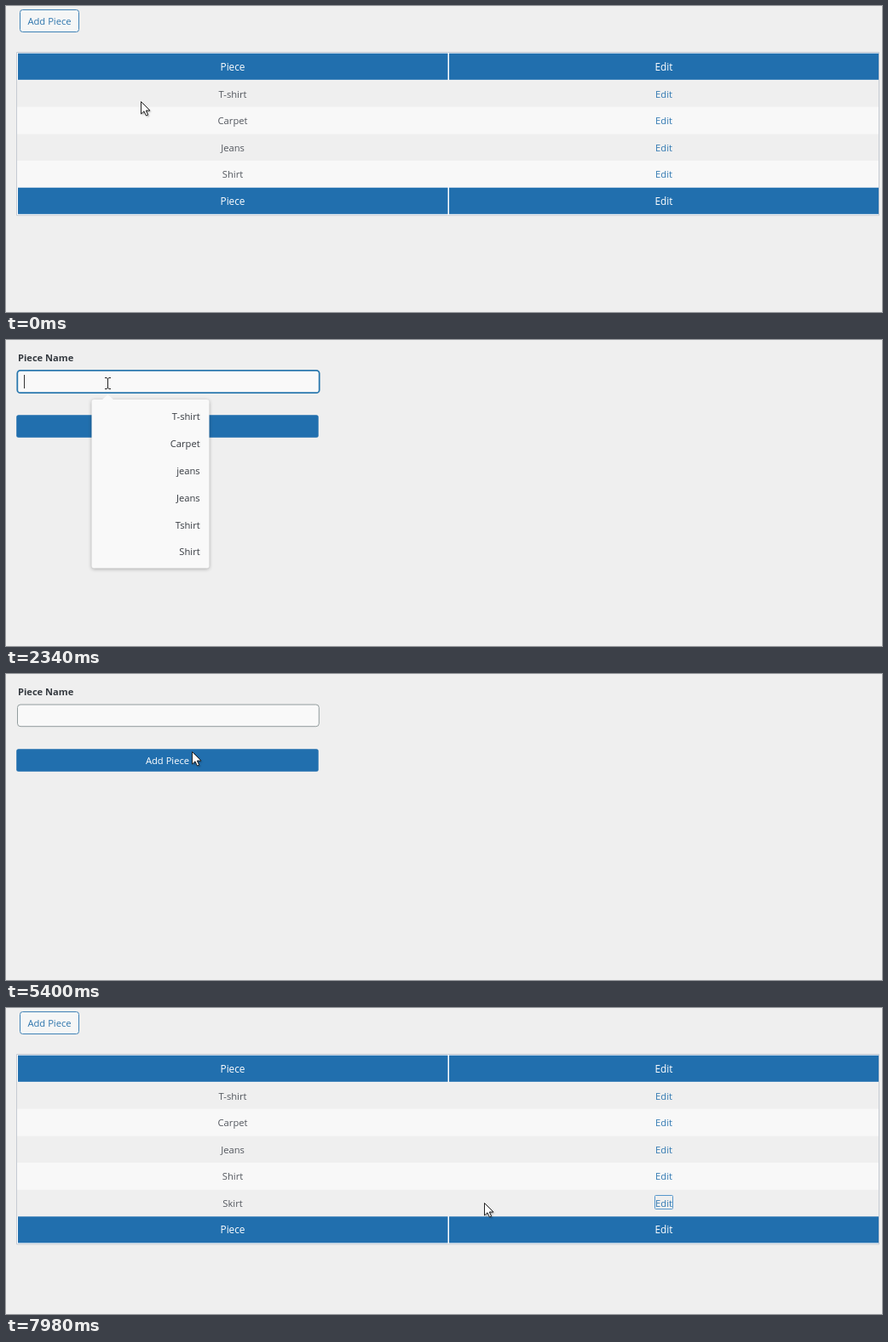
These frames come from a looping animation (1028 by 360 pixels, 8 s). An HTML page with a canvas:

```html
<!DOCTYPE html>
<html lang="en">
<head>
<meta charset="utf-8">
<title>Add a piece</title>
<style>
html, body { margin: 0; width: 100%; height: 100%; overflow: hidden; background: #efefef; }
canvas { display: block; }
</style>
</head>
<body>
<canvas id="stage" width="1028" height="360"></canvas>
<script>
const c = document.getElementById('stage').getContext('2d');
const LOOP = 8000, STEP = 30, PITCH = 31.6;
const BLUE = '#216fae', BG = '#efefef', PALE = '#f8f8f8';

// When things happen, in ms
const T = { addFocus: 690, form: 1680, inputFocus: 2190, list: 2280, submit: 3570,
  reload: 4620, loaded: 5430, table: 6510, scroll: 6780, linkFocus: 7410 };
const keys = [2550, 2670, 2790, 2880, 2970], word = 'Skirt';

// Pointer stops: time, x, y
const path = [
  [0, 158, 112], [510, 58, 20], [1020, 58, 20], [1590, 225, 77], [1680, 225, 77],
  [2100, 119, 51], [3060, 119, 51], [3480, 67, 106], [3660, 67, 106], [3840, 478, 192],
  [4050, 350, 165], [4560, 185, 122], [5130, 185, 122], [5400, 218, 91], [5670, 431, 173],
  [6210, 566, 186], [6900, 566, 186], [7260, 769, 226], [7500, 769, 226], [7920, 561, 229],
  [8000, 561, 229]
];

const inside = ([x, y], l, t, r, b) => x >= l && x < r && y >= t && y < b;

function pointerAt(t) {
  const i = path.findIndex(p => p[0] > t);
  const [t0, x0, y0] = path[i - 1], [t1, x1, y1] = path[i];
  const k = (t - t0) / (t1 - t0), e = k * k * (3 - 2 * k);
  return [Math.round(x0 + (x1 - x0) * e), Math.round(y0 + (y1 - y0) * e)];
}

function rect(l, t, r, b, fill) {
  c.fillStyle = fill;
  c.fillRect(l, t, r - l, b - t);
}

function box(l, t, r, b, radius, fill, stroke, width = 1) {
  c.beginPath();
  c.roundRect(l, t, r - l, b - t, radius);
  if (fill) { c.fillStyle = fill; c.fill(); }
  if (stroke) { c.strokeStyle = stroke; c.lineWidth = width; c.stroke(); }
}

function text(s, x, middle, color, align = 'center', size = 11.2, weight = 400) {
  c.font = `${weight} ${size}px "Open Sans", "Noto Sans", sans-serif`;
  c.textAlign = align;
  c.fillStyle = color;
  c.fillText(s, x, Math.round(middle + 4));
}

function shadow(color, blur, dx, dy) {
  c.shadowColor = color;
  c.shadowBlur = blur;
  c.shadowOffsetX = dx;
  c.shadowOffsetY = dy;
}

function drawTable(t, pointer) {
  const names = ['T-shirt', 'Carpet', 'Jeans', 'Shirt'];
  const late = t >= T.table;
  let scroll = 0;
  if (late) {
    names.push('Skirt');
    scroll = 39.6 * Math.min(1, Math.max(0, 1 - (t - T.scroll) / 120));
  }
  const edge = i => 55.7 + PITCH * i - scroll;
  const middle = i => 72.3 + 31.45 * i - scroll;
  const last = names.length + 1;

  const dy = -Math.round(scroll);
  const focused = !late && t >= T.addFocus;
  const over = inside(pointer, 16, 4 + dy, 86, 31 + dy);
  if (focused) box(16, 4 + dy, 86, 31 + dy, 3, '#f5f6f6', '#3a80b8', 2);
  else box(16.5, 4.5 + dy, 85.5, 30.5 + dy, 3, '#f5f6f6', '#3f82b6');
  text('Add Piece', 51, 18 + dy, over ? '#0a4b78' : '#2f76ad');

  box(12.5, edge(0) - 1.2, 1024.5, edge(last + 1) + 1, 0, '#fff', '#c5cad2');
  for (let i = 0; i <= last; i++) {
    const head = i === 0 || i === last;
    const top = edge(i), bottom = edge(i + 1) - (head ? .5 : 0);
    if (head) {
      rect(14, top, 518.5, bottom, BLUE);
      rect(520, top, 1024, bottom, BLUE);
      text('Piece', 266, middle(i), '#fff', 'center', 11.8);
      text('Edit', 772, middle(i), '#fff', 'center', 11.8);
    } else {
      rect(13, top, 1024, bottom, i % 2 ? BG : PALE);
      text(names[i - 1], 266, middle(i), '#53575e');
      text('Edit', 772, middle(i), '#3279b2');
    }
  }
  if (late && t >= T.linkFocus) box(761.5, 220.5, 782.5, 236.5, 1, null, '#5596cb');
  const onLink = late && inside(pointer, 762, middle(5) - 8, 782, middle(5) + 8);
  return over || onLink ? 'hand' : 'arrow';
}

function drawList() {
  c.save();
  shadow('rgba(0,0,0,.3)', 4, 0, 1);
  box(100.5, 70, 238.5, 268.5, 3, '#f9f9f9');
  c.restore();
  c.beginPath();
  c.moveTo(112, 71);
  c.lineTo(119.5, 64);
  c.lineTo(127, 71);
  c.fillStyle = '#f9f9f9';
  c.fill();
  ['T-shirt', 'Carpet', 'jeans', 'Jeans', 'Tshirt', 'Shirt'].forEach((s, i) =>
    text(s, 227.7, 90.4 + 31.8 * i, '#363a40', 'right'));
}

function drawForm(t, pointer) {
  text('Piece Name', 14, 21.4, '#34393f', 'left', 11.1, 700);

  const focused = t >= T.inputFocus && t < T.submit;
  if (focused) box(13.3, 35.8, 367.7, 62.2, 3.5, '#f9f9f9', '#2a78ae', 1.8);
  else box(13.5, 36, 367.3, 61.7, 3.5, '#f9f9f9', '#929c9d');
  const typed = t < T.reload ? word.slice(0, keys.filter(k => k <= t).length) : '';
  text(typed, 21, 49, '#3c4046', 'left');
  if (focused) {
    const since = Math.max(T.inputFocus, ...keys.filter(k => k <= t));
    const x = 21 + Math.round(c.measureText(typed).width);
    if ((t - since) % 1000 < 500) rect(x, 41, x + 1, 57, '#333');
  }

  const waiting = t >= T.reload && t < T.loaded;
  const over = !waiting && inside(pointer, 12, 88, 367, 115);
  if (t >= T.submit && t < T.reload) {
    box(9, 85, 370, 118, 5, BLUE);
    box(11, 87, 368, 116, 4, '#fff');
  }
  box(12.2, 88.3, 366.7, 114.7, 2.5, over ? '#10588f' : BLUE);
  text('Add Piece', 189.5, 102, '#fff');
  if (t >= T.list && t < keys[0]) drawList();
  if (over) return 'hand';
  return inside(pointer, 13, 36, 367, 62) ? 'beam' : 'arrow';
}

const shapes = {
  arrow: new Path2D('M.5 .5V15L4 11.8L6.4 17L8.6 16L6.3 11H11Z'),
  hand: new Path2D('M-1.5 12V1.5Q0 -.5 1.5 1.5V7Q3 5.5 4.3 7.5Q6 6.5 7 8.5Q9 7.5 9.5 10V14Q9 17 7.5 19.5H0Q-2 16 -4.5 13Q-5.5 10 -3 10.5Z'),
  beam: new Path2D('M-3 -6.5H-1L.5 -5.5L2 -6.5H4M.5 -5.5V5.5M-3 6.5H-1L.5 5.5L2 6.5H4')
};

function drawPointer(kind, [x, y]) {
  c.save();
  c.translate(x, y);
  if (kind !== 'beam') {
    shadow('rgba(0,0,0,.35)', 2, 1.5, 1.5);
    c.fillStyle = '#fff';
    c.fill(shapes[kind]);
    shadow('transparent', 0, 0, 0);
  }
  c.strokeStyle = '#222';
  c.lineWidth = 1;
  c.stroke(shapes[kind]);
  c.restore();
}

function draw(now) {
  const t = Math.floor(now % LOOP / STEP) * STEP;
  const pointer = pointerAt(t);
  rect(0, 0, 1028, 360, BG);
  const page = t >= T.form && t < T.table ? drawForm : drawTable;
  drawPointer(page(t, pointer), pointer);
}

const start = performance.now();
function tick() {
  draw(performance.now() - start);
  requestAnimationFrame(tick);
}
tick();
</script>
</body>
</html>
```
